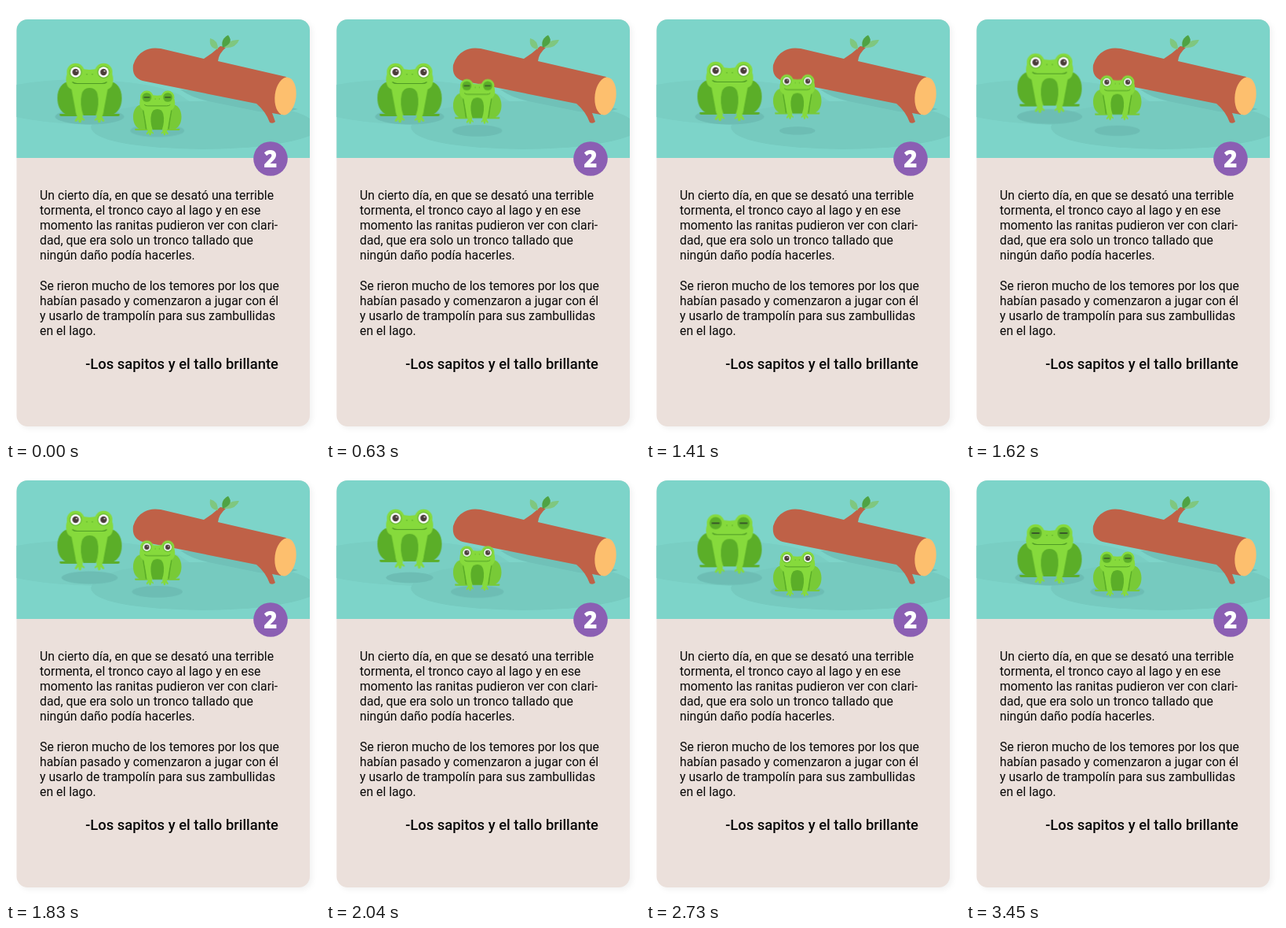
An HTML page for the animation above (4500 ms loop, 400 by 550 pixels).

```html
<!DOCTYPE html>
<html lang="es">
<head>
<meta charset="utf-8">
<title>Cuento</title>
<style>
html, body { margin: 0; width: 100%; height: 100%; overflow: hidden; background: #fff; }
svg { display: block; width: 100vw; height: 100vh; }
text { font-family: Roboto, sans-serif; }

.card { filter: drop-shadow(3px 3px 3px rgba(0,0,0,.05)); }
.big { --flank: #5bae28; }
.small { --flank: #78ca37; }

.hop, .shade, .awake, .asleep { animation: 4500ms linear infinite; }
.shade { transform-box: fill-box; transform-origin: center; }

.small .hop { animation-name: small-hop; }
.small .shade { animation-name: small-shade; }
.small .awake { animation-name: small-awake; }
.small .asleep { animation-name: small-asleep; }
.big .hop { animation-name: big-hop; }
.big .shade { animation-name: big-shade; }
.big .awake { animation-name: big-awake; }
.big .asleep { animation-name: big-asleep; }
.awake, .asleep { animation-timing-function: step-end; }

/* Hop heights are in frog units; the small frog is drawn at 0.75. */
@keyframes small-hop {
  0% { transform: none; }
  7.333% { transform: translateY(0); animation-timing-function: cubic-bezier(.2,.7,.38,1); }
  29.556% { transform: translateY(-27.4px); }
  32.667% { transform: translateY(-27.4px); animation-timing-function: cubic-bezier(.37,0,.63,1); }
  54%, 100% { transform: translateY(0); }
}
@keyframes big-hop {
  0% { transform: none; }
  30.667% { transform: translateY(0); animation-timing-function: cubic-bezier(.2,.7,.38,1); }
  52.889% { transform: translateY(-20px); }
  54.667% { transform: translateY(-20px); animation-timing-function: cubic-bezier(.65,0,.35,1); }
  68%, 100% { transform: translateY(0); }
}
@keyframes small-shade {
  0% { transform: scale(1); }
  7.333% { transform: scale(1); animation-timing-function: ease-in-out; }
  27.333% { transform: scale(.66); }
  31.333% { transform: scale(.66); animation-timing-function: cubic-bezier(.215,.61,.355,1); }
  54%, 100% { transform: scale(1); }
}
@keyframes big-shade {
  0% { transform: scale(1); }
  30.667% { transform: scale(1); animation-timing-function: ease-in-out; }
  50.667% { transform: scale(.63); }
  54.667% { transform: scale(.63); animation-timing-function: cubic-bezier(.215,.61,.355,1); }
  68%, 100% { transform: scale(1); }
}
@keyframes small-awake { 0%, 73.333%, 100% { opacity: 0; } 30.667% { opacity: 1; } }
@keyframes small-asleep { 0%, 73.333%, 100% { opacity: 1; } 30.667% { opacity: 0; } }
@keyframes big-awake { 0% { opacity: 1; } 54.667%, 100% { opacity: 0; } }
@keyframes big-asleep { 0% { opacity: 0; } 54.667%, 100% { opacity: 1; } }
</style>
</head>
<body>
<svg viewBox="0 0 400 550">
  <defs>
    <clipPath id="card"><rect x="13.5" y="17" width="373.5" height="517" rx="14"/></clipPath>

    <!-- Frog parts share one axis at x = 0; y = 0 is the top of the eyes. -->
    <g id="side">
      <path d="M-20 25 C-32 21 -41 31 -41 45 C-41 55 -37 62 -31 65 L-38 65 Q-39 68 -36 68 L-15 68 L-10 40Z" style="fill: var(--flank)"/>
      <path d="M-24 34 Q-21 50 -19 66" fill="none" stroke="#5bae28" stroke-width="2"/>
      <circle cx="-17.8" cy="12" r="11.2" fill="#86da3c"/>
      <path d="M-18 60 L-8 60 L-9 70 Q-5 72 -7 74 L-10 72 L-11 76 Q-13 77 -14 75 L-14 72 L-17 75 Q-20 75 -18 72 L-16 69Z" fill="#86da3c"/>
    </g>
    <g id="body">
      <use href="#side"/>
      <use href="#side" transform="scale(-1 1)"/>
      <path d="M-30 22 Q-30 8 -17 6 Q-8 9 0 9 Q8 9 17 6 Q30 8 30 22 Q30 31 23 34 L17 66 L-17 66 L-23 34 Q-30 31 -30 22Z" fill="#86da3c"/>
      <path d="M-8 67 Q-13 52 -10 40 Q-8 32 0 32 Q8 32 10 40 Q13 52 8 67Z" fill="#5bae28"/>
      <path d="M-22 24.5 Q-20 26.5 -16 26.5 L16 26.5 Q20 26.5 22 24.5" fill="none" stroke="#4e9a24" stroke-width="1.2"/>
      <path d="M-3.5 14 v1.5 M3.5 14 v1.5" stroke="#5bae28" stroke-width="1.2"/>
    </g>
    <g id="eye-open">
      <circle r="7.8" fill="#5bae28"/>
      <circle r="6.7" fill="#fff"/>
      <circle r="4.2" fill="#4a3c3a"/>
      <circle cx="1.2" cy="-1.4" r=".9" fill="#fff"/>
    </g>
    <g id="eye-shut">
      <circle r="7.8" fill="#5bae28"/>
      <path d="M-5 0 H5" stroke="#35502a" stroke-width="1.8"/>
    </g>
    <g id="open"><use href="#eye-open" x="-17.8" y="12"/><use href="#eye-open" x="17.8" y="12"/></g>
    <g id="shut"><use href="#eye-shut" x="-17.8" y="12"/><use href="#eye-shut" x="17.8" y="12"/></g>
  </defs>

  <g class="card">
    <g clip-path="url(#card)">
      <rect x="13" y="16" width="375" height="519" fill="#ebe0db"/>
      <rect x="13" y="16" width="375" height="177" fill="#7dd4c9"/>
      <path d="M13 100 Q70 90 130 95 Q190 98 222 113 L260 140 Q180 155 90 150 Q45 148 13 141Z" fill="#79cec3"/>
      <path d="M108 154 Q113 132 190 124 Q270 116 340 128 Q375 134 387 143 L387 165 Q345 181 250 182 Q112 179 108 154Z" fill="#76cabf"/>
      <path d="M222 106 L300 112 L372 131 Q350 137 322 134 L258 121 Q235 116 222 106Z" fill="#70c1b8"/>

      <path d="M176 57 Q184 52 197 54 L252 67 Q263 60 273 51 L281 52 Q271 60 270 70 L357 90 L350 138 L339 136 Q341 141 343 147 Q340 150 336 148 Q331 134 319 124 L174 95 Q160 91 162 75 Q166 62 176 57Z" fill="#bf6147"/>
      <ellipse cx="356" cy="114.5" rx="13.5" ry="24" transform="rotate(7 356 114.5)" fill="#fdbf6e"/>
      <path d="M270 55 Q258 54 260 41 Q270 43 270 55Z M278 53 Q283 42 297 43 Q293 54 278 53Z" fill="#7fc77f"/>
      <path d="M276 53 Q273 42 283 37 Q291 47 276 53Z" fill="#4fa344"/>
    </g>
  </g>

  <g class="big" transform="translate(106.5 72)">
    <ellipse class="shade" cx="0" cy="68.5" rx="44" ry="10" fill="#6dbdb4"/>
    <g class="hop">
      <use href="#body"/>
      <use class="awake" href="#open"/>
      <use class="asleep" href="#shut"/>
    </g>
  </g>
  <g class="small" transform="translate(192.7 107) scale(.75)">
    <ellipse class="shade" cx="0" cy="68.5" rx="46" ry="10.5" fill="#6dbdb4"/>
    <g class="hop">
      <use href="#body"/>
      <use class="awake" href="#open"/>
      <use class="asleep" href="#shut"/>
    </g>
  </g>

  <circle cx="337" cy="194" r="21.8" fill="#8b5fb3"/>
  <text x="337" y="205" text-anchor="middle" fill="#fff" style="font: 800 29.5px 'Open Sans', sans-serif">2</text>

  <g font-size="15.8" fill="#080808">
    <text x="43" y="245.5">Un cierto día, en que se desató una terrible</text>
    <text x="43" y="264.7">tormenta, el tronco cayo al lago y en ese</text>
    <text x="43" y="283.9">momento las ranitas pudieron ver con clari-</text>
    <text x="43" y="303.1">dad, que era solo un tronco tallado que</text>
    <text x="43" y="322.3">ningún daño podía hacerles.</text>
    <text x="43" y="360.7">Se rieron mucho de los temores por los que</text>
    <text x="43" y="379.9">habían pasado y comenzaron a jugar con él</text>
    <text x="43" y="399.1">y usarlo de trampolín para sus zambullidas</text>
    <text x="43" y="418.3">en el lago.</text>
  </g>
  <text x="347" y="460.5" text-anchor="end" font-size="18.4" font-weight="500" fill="#080808">-Los sapitos y el tallo brillante</text>
</svg>
</body>
</html>
```
